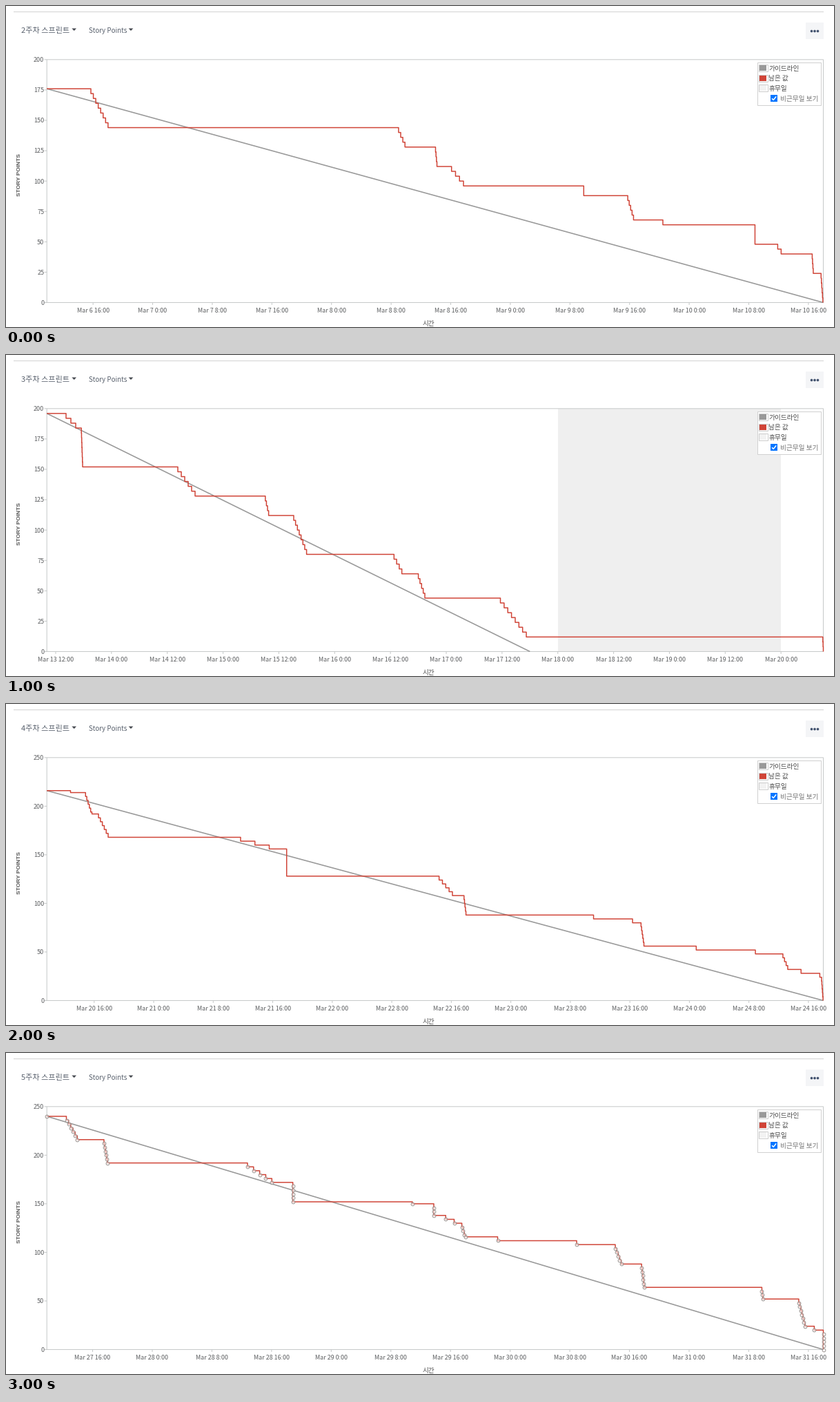
A matplotlib script for the animation above (4000 ms loop, 1200 by 466 pixels).

```python
import math

import matplotlib.pyplot as plt
from matplotlib.animation import FuncAnimation
from matplotlib.patches import Circle, Polygon, Rectangle

W, H, DPI = 1200, 466, 100
PX = 72 / DPI
LEFT, RIGHT, TOP, BOTTOM = 59.2, 1184.5, 77.8, 430.5
GRAY, RED, BORDER = "#999999", "#d04437", "#c6c9c9"
HEADER_INK, AXIS_INK = "#5a626e", "#5e6062"
FONT = "Noto Sans CJK JP"

# Hours count from midnight of a sprint's first day.
FRIDAY_CLOSE = 4 * 24 + 18
WEEKEND = (5 * 24, 7 * 24)
TASK_POINTS = 4

# A burst (hour, duration, level) closes evenly spaced tasks down to a level.
SPRINTS = [
    dict(opens=9.8, closes=FRIDAY_CLOSE, total=176, bursts=[
        (15.71, 2.3, 144), (57, .86, 128), (61.96, .19, 112), (64.11, 1.6, 96),
        (81.85, 0, 88), (87.76, .77, 68), (92.47, 0, 64), (104.83, 0, 48),
        (107.88, .46, 40), (112.51, .14, 24), (113.7, .24, 0)]),
    dict(opens=10.1, closes=177.1, total=196, bursts=[
        (14.23, 2.08, 184), (17.52, .27, 152), (38.27, 3.71, 128),
        (57.09, .71, 112), (63.2, 2.76, 80), (84.77, 1.68, 64), (90, 1.4, 44),
        (107.65, 5.57, 12), (177, .1, 0)]),
    dict(opens=9.64, closes=FRIDAY_CLOSE, total=216, bursts=[
        (12.82, 0, 214), (14.84, .86, 192), (16.58, 1.3, 168),
        (35.68, 3.85, 156), (41.87, 0, 128), (62.36, 1.79, 108),
        (65.71, .26, 88), (83.12, 5.24, 80), (89.5, .39, 56),
        (96.92, 7.95, 48), (108.57, .65, 32), (111.01, 2.52, 24),
        (113.77, .19, 0)]),
    dict(opens=9.86, closes=FRIDAY_CLOSE, total=240, markers=True, bursts=[
        (12.48, 1.46, 216), (17.52, .46, 192), (36.77, 3.27, 172),
        (42.85, 0, 152), (58.89, 0, 150), (61.76, 0, 138), (63.36, 1.13, 130),
        (65.52, .49, 116), (70.32, 10.6, 108), (86.1, .79, 88),
        (89.63, .35, 64), (105.76, .14, 52), (110.71, .83, 24),
        (112.79, 0, 20), (114, 0, 0)]),
]

fig = plt.figure(figsize=(W / DPI, H / DPI), dpi=DPI, facecolor="white")
ax = fig.add_axes([0, 0, 1, 1])


def line(xs, ys, color, width=1, **style):
    ax.plot(xs, ys, color=color, lw=width * PX, snap=False,
            solid_capstyle="butt", **style)


def box(x0, y0, x1, y1, fill, edge="none", z=2, **style):
    ax.add_patch(Rectangle((x0, y0), x1 - x0, y1 - y0, facecolor=fill,
                           edgecolor=edge, lw=PX, zorder=z, **style))


def label(x, middle, text, size, color=AXIS_INK, ha="left"):
    ax.text(x, middle + 0.38 * size, text, fontsize=size * PX, color=color,
            family=FONT, ha=ha, va="baseline", zorder=8)


def scales(sprint):
    """Return the value at the top and the hour-to-x and value-to-y mappings."""
    peak = math.ceil(sprint["total"] / 50) * 50
    opens, closes = sprint["opens"], sprint["closes"]

    def to_x(hour):
        return LEFT + (RIGHT - LEFT) * (hour - opens) / (closes - opens)

    def to_y(value):
        return BOTTOM - (BOTTOM - TOP) * value / peak

    return peak, to_x, to_y


def closed_tasks(sprint):
    """List (hour, remaining points) after every closed task."""
    level = sprint["total"]
    events = [(sprint["opens"], level)]
    for hour, duration, target in sprint["bursts"]:
        count = math.ceil((level - target) / TASK_POINTS)
        for i in range(count):
            level = max(level - TASK_POINTS, target)
            events.append((hour + duration * i / max(count - 1, 1), level))
    return events


def draw_header(week):
    line([11, 1185], [8.5, 8.5], "#d2d2d2")
    label(21.5, 34.5, f"{week}주차 스프린트", 11.1, HEADER_INK)
    label(120.3, 34.8, "Story Points", 9.8, HEADER_INK)
    for x in (98.7, 181):
        ax.add_patch(Polygon([(x - 3.3, 32.5), (x + 3.3, 32.5), (x, 36)],
                             color="#42464d", lw=0))
    box(1159, 24, 1185, 47.5, "#f4f5f7")
    for x in (1167.5, 1172, 1176.5):
        ax.add_patch(Circle((x, 36.5), 1.8, color="#42526e", lw=0, zorder=3))


def draw_axes(sprint, first_day):
    peak, to_x, to_y = scales(sprint)
    box(LEFT, TOP, RIGHT, BOTTOM, "none", BORDER, snap=False)
    for value in range(0, peak + 1, 25 if peak <= 200 else 50):
        y = to_y(value)
        line([55.5, LEFT], [y, y], BORDER)
        label(55.3, y, str(value), 9, ha="right")
    step = 8 if sprint["closes"] - sprint["opens"] < 120 else 12
    first = math.ceil(sprint["opens"] / step) * step
    for hour in range(first, int(sprint["closes"]) + 1, step):
        x = to_x(hour)
        day, clock = divmod(hour, 24)
        line([x, x], [BOTTOM, 434], BORDER)
        label(x, 442, f"Mar {first_day + day} {clock}:00", 8.9, ha="center")
    label(612.8, 460, "시간", 9.6, "#555555", "center")
    ax.text(19.3, 245, "STORY POINTS", fontsize=8.4 * PX, color="#555555",
            family="Liberation Sans", weight="bold", rotation=90,
            ha="center", va="center")


def draw_series(sprint):
    _, to_x, to_y = scales(sprint)
    if sprint["closes"] > WEEKEND[0]:
        box(to_x(WEEKEND[0]), TOP, to_x(WEEKEND[1]), BOTTOM, "#efefef", z=1)
    line([LEFT, to_x(FRIDAY_CLOSE)], [to_y(sprint["total"]), BOTTOM],
         GRAY, 1.6, zorder=4)
    dots = [(to_x(hour), to_y(value)) for hour, value in closed_tasks(sprint)]
    xs, ys = zip(*dots)
    line(xs, ys, RED, 1.5, zorder=5, drawstyle="steps-post")
    if sprint.get("markers"):
        ax.plot(xs, ys, "o", ms=4.8 * PX, mfc=(1, 1, 1, 0.55), mec="#938b87",
                mew=0.9 * PX, zorder=6, snap=False)


def draw_legend():
    box(1088.5, 81.5, 1180.5, 143.5, "white", "#d0d0d0", 7)
    rows = [("가이드라인", GRAY), ("남은 값", RED), ("휴무일", "#f2f2f2")]
    for i, (text, color) in enumerate(rows):
        y = 90.3 + 14.3 * i
        box(1090.5, y - 5, 1103.5, y + 5, "white", "#cccccc", 7)
        box(1092, y - 4, 1102, y + 4, color, z=8)
        label(1105.3, y, text, 9.7, "#4c4c4c")
    box(1108, 129, 1118, 139, "#0075ff", z=8)
    line([1110, 1112.2, 1116.2], [134.2, 136.4, 131.4], "white", 1.5, zorder=9)
    label(1122.3, 134.8, "비근무일 보기", 9.7, "#777777")


def draw(frame):
    index = frame % len(SPRINTS)
    sprint = SPRINTS[index]
    ax.clear()
    ax.set(xlim=(0, W), ylim=(H, 0))
    ax.axis("off")
    draw_header(week=2 + index)
    draw_axes(sprint, first_day=6 + 7 * index)
    draw_series(sprint)
    draw_legend()
    return []


animation = FuncAnimation(fig, draw, frames=len(SPRINTS), interval=1000,
                          repeat=True, repeat_delay=0)
plt.show()
```
